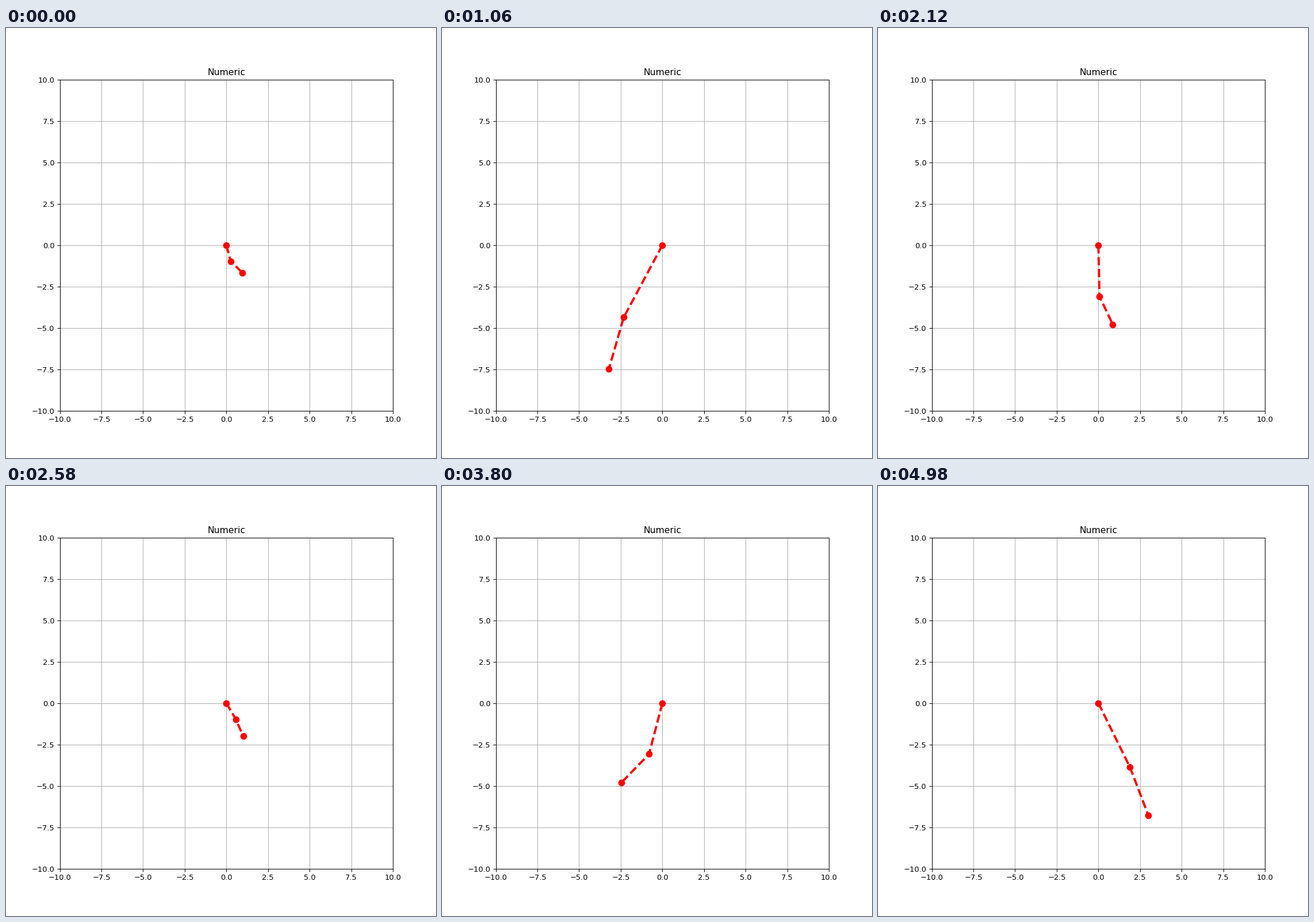
Recreate the animation shown at these times as a matplotlib script. Size 748 px wide and 748 px high, loop 5 s.

```python
import numpy as np
import matplotlib.pyplot as plt
from matplotlib.animation import FuncAnimation

FRAMES, STEP = 250, 20  # count, ms
G, K, REST = 10, 10, 1  # gravity, stiffness per unit mass, rod length at rest


def oscillate(t, A, u0, v0):
    """Solve u'' = -A u by normal modes; one row per time."""
    lam, modes = np.linalg.eig(A)
    w = np.sqrt(lam)
    a = np.linalg.solve(modes, u0)
    b = np.linalg.solve(modes, v0) / w
    wt = np.outer(t, w)
    return (a * np.cos(wt) + b * np.sin(wt)) @ modes.T


t = np.arange(FRAMES) * STEP / 1000

# Small swings of a double pendulum
swing = G / REST * np.array([[2, -1], [-2, 2]])
theta = oscillate(t, swing, [np.pi / 12, np.pi / 4], [0, 0])

# Two stacked springs bouncing around their sagging balance, both let go
# unstretched with each rod growing at speed 2
spring = K * np.array([[2, -1], [-1, 1]])
sag = np.linalg.solve(spring, [G, G])
drop = sag + oscillate(t, spring, -sag, [2, 4])
length = REST + np.diff(drop, axis=1, prepend=0)

# Joint positions, starting at the pivot
start = np.zeros((FRAMES, 1))
x = np.hstack([start, np.cumsum(length * np.sin(theta), axis=1)])
y = np.hstack([start, np.cumsum(-length * np.cos(theta), axis=1)])

fig, ax = plt.subplots(figsize=(8, 8), dpi=93.5)
ax.set(xlim=(-10, 10), ylim=(-10, 10), title="Numeric")
ax.grid()
rods, = ax.plot([], [], "ro--", lw=3, markersize=8)


def draw(i):
    rods.set_data(x[i], y[i])
    return rods,


anim = FuncAnimation(fig, draw, frames=FRAMES, interval=STEP,
                     repeat=True, repeat_delay=0, blit=True)
plt.show()
```
